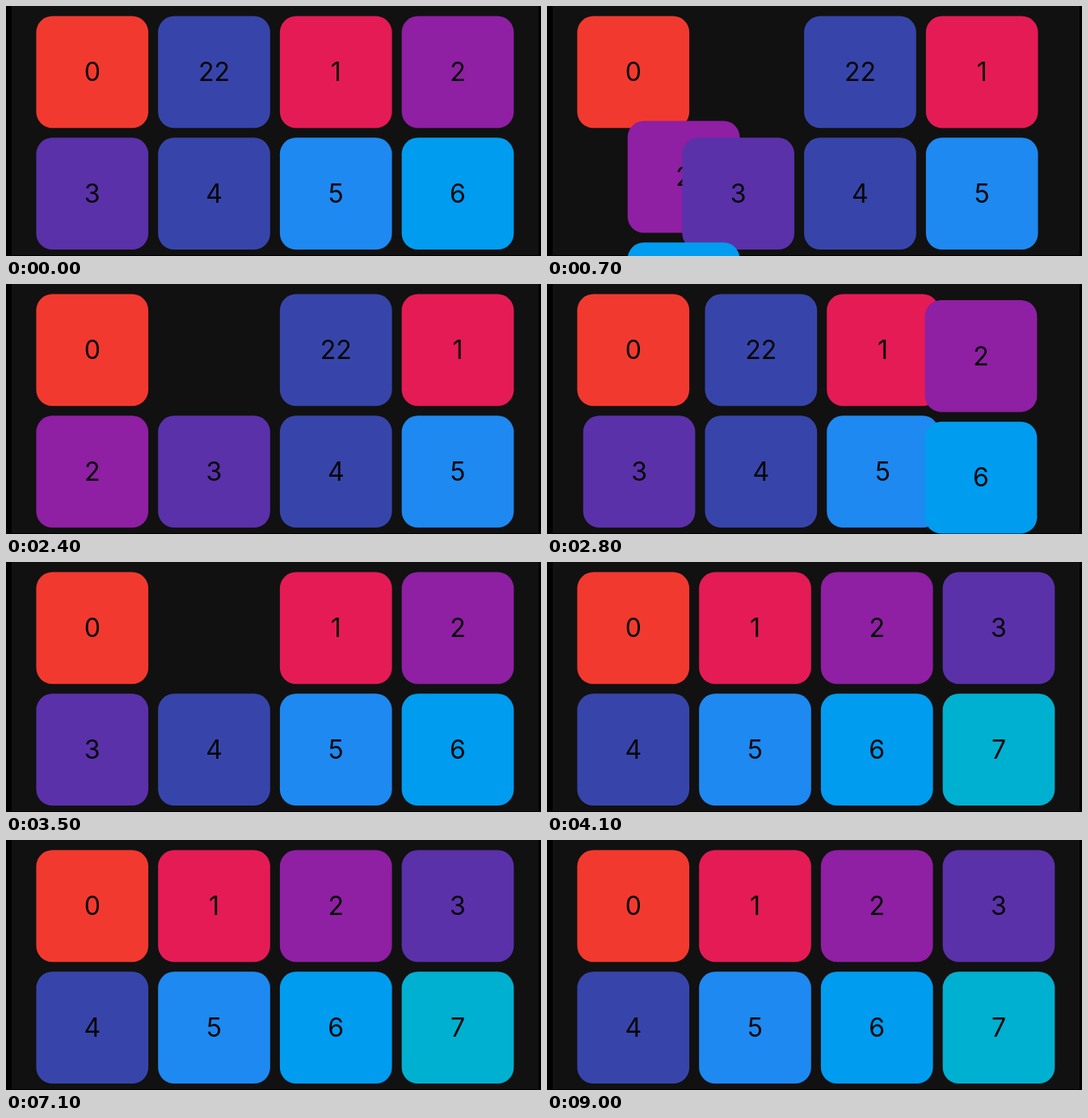
Recreate the animation shown at these times as an HTML page with a canvas. Size 662x310 px, loop 9.1 s.

```html
<!DOCTYPE html>
<html lang="en">
<head>
<meta charset="utf-8">
<title>Animated grid</title>
<style>
  html, body { margin: 0; width: 100%; height: 100%; overflow: hidden; background: #000; }
  canvas { display: block; }
</style>
</head>
<body>
<canvas id="stage" width="662" height="310"></canvas>
<script>
const ctx = document.getElementById('stage').getContext('2d');
const LOOP = 9100, STEP = 100, DURATION = 300;
const LEFT = 37.4, TOP = 12.6, PITCH = 150.75, SIZE = 138.7, RADIUS = 20, COLUMNS = 4;
const COLORS = ['#f2392f', '#e51b56', '#8f1fa3', '#5a31a9', '#3745aa', '#1e89f1', '#009cf0', '#00b0d0'];

// Eased 0..1 progress of a transition that begins at start.
function ease(t, start) {
  const p = Math.min(1, Math.max(0, (t - start) / DURATION));
  return p * p * (3 - 2 * p);
}

const cell = i => [LEFT + i % COLUMNS * PITCH, TOP + Math.floor(i / COLUMNS) * PITCH];

// Fractional slots lie on the straight line between neighbouring cells.
function place(slot) {
  const i = Math.floor(slot), f = slot - i;
  const [x0, y0] = cell(i), [x1, y1] = cell(i + 1);
  return [x0 + (x1 - x0) * f, y0 + (y1 - y0) * f];
}

function tile(label, color, slot, presence = 1) {
  if (presence <= 0) return;
  const [x, y] = place(slot);
  ctx.save();
  ctx.translate(x + SIZE / 2, y + SIZE / 2);
  ctx.scale(presence, presence);
  ctx.globalAlpha = presence;
  ctx.fillStyle = color;
  ctx.beginPath();
  ctx.roundRect(-SIZE / 2, -SIZE / 2, SIZE, SIZE, RADIUS);
  ctx.fill();
  ctx.fillStyle = '#080808';
  ctx.fillText(label, 0, 11.3);
  ctx.restore();
}

function draw(now) {
  const t = Math.floor(now % LOOP / STEP) * STEP;
  const pushed = 1 + ease(t, 470) - ease(t, 2540);
  const shift = pushed - ease(t, 3750);

  ctx.fillStyle = '#000';
  ctx.fillRect(0, 0, 662, 310);
  ctx.fillStyle = '#111';
  ctx.fillRect(7, 0, 652, 309);
  ctx.font = '32px Inter, sans-serif';
  ctx.textAlign = 'center';

  tile(0, COLORS[0], 0);
  tile(23, COLORS[5], 1, ease(t, 780) - ease(t, 2070));
  tile(22, COLORS[4], pushed, 1 - ease(t, 3170));
  for (let i = 1; i < COLORS.length; i++) tile(i, COLORS[i], i + shift);

  requestAnimationFrame(draw);
}
requestAnimationFrame(draw);
</script>
</body>
</html>
```
